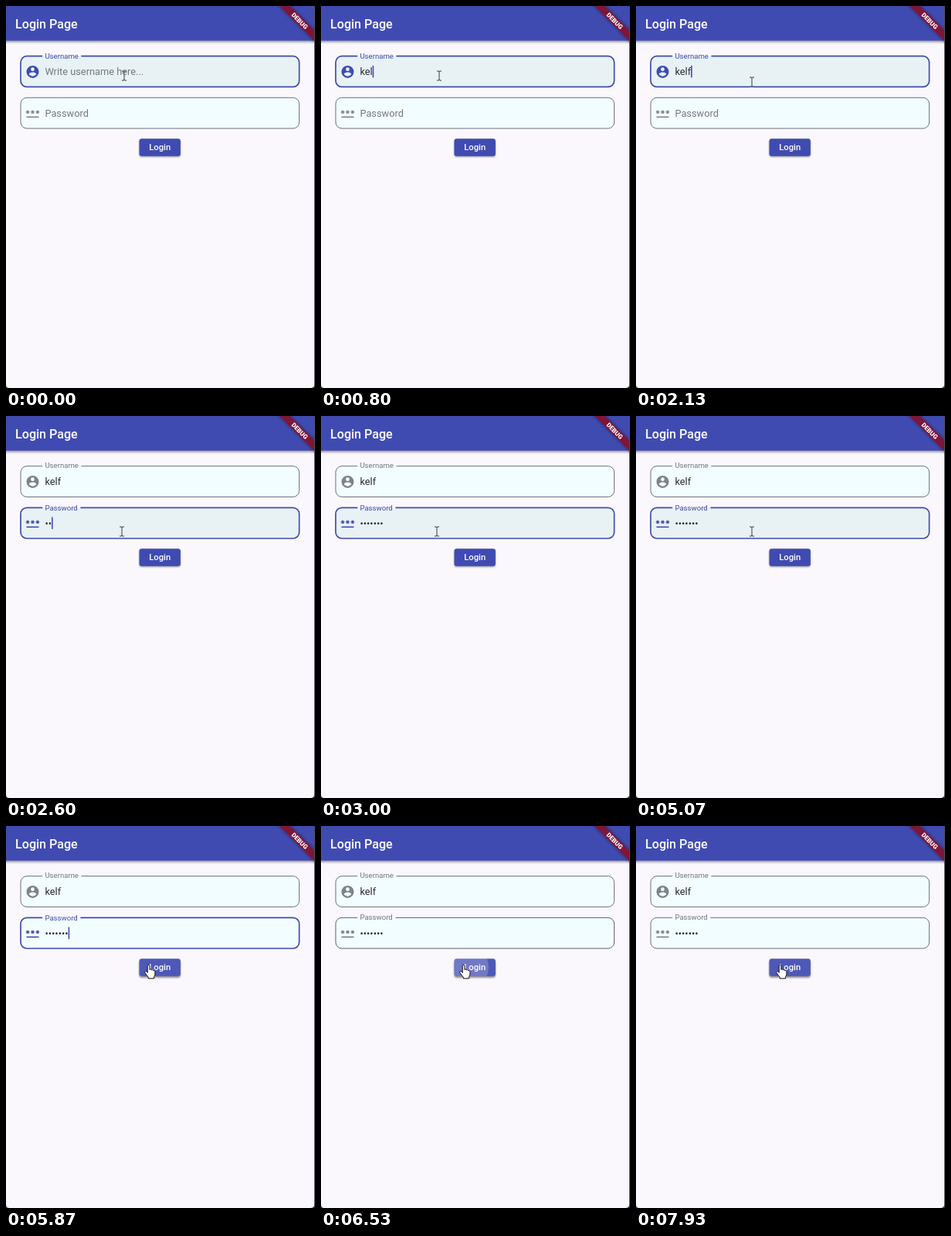
Recreate the animation shown at these times as an HTML page. Size 400 by 493 pixels, loop 8 s.

```html
<!DOCTYPE html>
<html lang="en">
<head>
<meta charset="utf-8">
<title>Login Page</title>
<style>
  html, body { margin: 0; width: 100%; height: 100%; overflow: hidden; background: #faf8fc; }
  svg { display: block; width: 100vw; height: 100vh; }
  text { font-family: Roboto, sans-serif; font-size: 12.8px; white-space: pre; }
</style>
</head>
<body>
<svg id="stage" viewBox="0 0 400 493">
  <defs>
    <filter id="barShadow" x="-5%" y="-20%" width="110%" height="160%">
      <feDropShadow dx="0" dy="1.8" stdDeviation="1.8" flood-opacity=".42"/>
    </filter>
    <filter id="ribbonShadow" x="-20%" y="-80%" width="140%" height="260%">
      <feDropShadow dx="0" dy="0" stdDeviation="2" flood-opacity=".5"/>
    </filter>
    <filter id="soft" x="-20%" y="-40%" width="140%" height="200%">
      <feGaussianBlur stdDeviation="1.2"/>
    </filter>
    <clipPath id="buttonClip"><rect x="172.5" y="171.2" width="53.4" height="22.6" rx="3.2"/></clipPath>
    <path id="star" d="M3.15 12.95 4 11.47l.85 1.48 1.3-.75-.85-1.48H7v-1.5H5.3l.85-1.47L4.85 7 4 8.47 3.15 7l-1.3.75.85 1.47H1v1.5h1.7l-.85 1.48z"/>
  </defs>

  <rect width="400" height="493" fill="#faf8fc"/>
  <rect x="-5" y="-10" width="410" height="54.7" fill="#404bb1" filter="url(#barShadow)"/>
  <text x="12" y="28.8" style="font-size:16.1px" fill="#fff" font-weight="500">Login Page</text>

  <g id="fields"></g>

  <rect id="buttonShadow" x="172.5" y="172.6" width="53.4" height="22.4" rx="3.2" filter="url(#soft)"/>
  <rect id="button" x="172.5" y="171.2" width="53.4" height="22.6" rx="3.2"/>
  <g clip-path="url(#buttonClip)"><circle id="ripple" cx="186" cy="182" fill="#fff"/></g>
  <text x="199.2" y="186.4" text-anchor="middle" style="font-size:11.2px" font-weight="500" fill="#fff">Login</text>

  <g transform="translate(399.4 0) rotate(45)">
    <rect x="-36" y="22.4" width="72" height="9.6" fill="#7d1638" filter="url(#ribbonShadow)"/>
    <text y="30.1" text-anchor="middle" style="font-size:8.16px" font-weight="900" fill="#fff">DEBUG</text>
  </g>

  <path d="M399.5 0V493" stroke="#4a4a52"/>
  <path d="M0 488.5Q0 493 4.5 493H0zM400 487V493H394Q399 493 400 487z" fill="#33333a"/>

  <g id="beam" fill="none">
    <path d="M-3-6H-1Q0-6 0-5Q0-6 1-6H3M0-5V5M-3 6H-1Q0 6 0 5Q0 6 1 6H3" stroke="#fff" stroke-width="2" opacity=".5"/>
    <path d="M-3-6H-1Q0-6 0-5Q0-6 1-6H3M0-5V5M-3 6H-1Q0 6 0 5Q0 6 1 6H3" stroke="#2e3236"/>
  </g>
  <path id="arrow" d="M0 0V13L3 10.3 5 15 7.2 14 5.2 9.5H9.2z" fill="#fff" stroke="#111" stroke-width=".9"/>
  <path id="hand" d="M-1.8-7.2Q-1.8-8.7-.5-8.7T.9-7.2V-2.6Q1.2-3.4 2.2-3.3T3.4-2Q3.8-2.7 4.7-2.5T5.8-1.2Q6.3-1.7 7.1-1.3T7.9.3V3.2Q7.9 5 6.6 6.5V8.8H-.8V7Q-3.2 4.6-4.9 1.5Q-5.7.2-4.7-.4T-2.8.1L-1.8 1.4Z" fill="#fff" stroke="#111" stroke-width="1" stroke-linejoin="round"/>
</svg>
<script>
const NS = 'http://www.w3.org/2000/svg';
const $ = id => document.getElementById(id);
const LOOP = 8000, NAME = 'kelf';
const PRIMARY = [64, 75, 177], GREY = [126, 131, 136], LINE = [92, 98, 102];
const FILL = [242, 253, 255], HOVER = [232, 242, 245];
const SWITCH = 2370, CLICK = 6400;
const nameKeys = [330, 500, 680, 930];
const dotKeys = Array.from({ length: 7 }, (_, i) => 2480 + i * 68);
const path = [[0, 153, 90], [2030, 153, 90], [2130, 150, 98], [2310, 150, 149],
  [5400, 150, 149], [5720, 185, 188], [6900, 185, 188], [7150, 187, 188], [LOOP, 187, 188]];

const clamp = v => Math.max(0, Math.min(1, v));
const lerp = (a, b, k) => a + (b - a) * k;
const ease = k => k * k * (3 - 2 * k);
const ramp = (t, start, length) => ease(clamp((t - start) / length));
const mix = (a, b, k) => `rgb(${a.map((v, i) => Math.round(lerp(v, b[i], k)))})`;
const typed = (keys, t) => keys.filter(k => t >= k).length;
const show = (el, on) => el.setAttribute('visibility', on ? 'visible' : 'hidden');

function set(el, attrs) {
  for (const k in attrs) el.setAttribute(k, attrs[k]);
  return el;
}
function add(parent, tag, attrs) {
  return parent.appendChild(set(document.createElementNS(NS, tag), attrs));
}

function makeField(y, title, hintText, drawIcon) {
  const g = add($('fields'), 'g', {});
  const fill = add(g, 'rect', { x: 19, y, width: 360.6, height: 39.7, rx: 8 });
  const border = add(g, 'path', { fill: 'none' });
  const icon = add(g, 'g', { transform: `translate(24.9 ${y + 10.6}) scale(.8)` });
  drawIcon(icon);
  const hint = add(g, 'text', { x: 50.4, y: y + 24.4, fill: '#73797d' });
  hint.textContent = hintText;
  const value = add(g, 'text', { x: 50.4, y: y + 24.4, fill: '#2a2c30' });
  const caret = add(g, 'rect', { y: y + 12.2, width: 1.6, height: 15.4, fill: '#404bb1' });
  const label = add(g, 'text', {});
  label.textContent = title;
  const labelWidth = title === 'Username' ? 43.6 : 42.6;

  return function draw({ focus, float, hover, text, blink }) {
    const gapL = lerp(68.8, 47.2, float), gapR = lerp(68.8, 50.4 + labelWidth + 3.4, float);
    const b = y + 39.7;
    set(fill, { fill: mix(FILL, HOVER, hover) });
    set(border, {
      d: `M${gapR} ${y}H371.6a8 8 0 0 1 8 8V${b - 8}a8 8 0 0 1-8 8H27a8 8 0 0 1-8-8V${y + 8}a8 8 0 0 1 8-8H${gapL}`,
      stroke: mix(LINE, PRIMARY, focus), 'stroke-width': lerp(.9, 1.7, focus)
    });
    set(icon, { fill: mix(GREY, PRIMARY, focus) });
    set(label, {
      transform: `translate(50.4 ${lerp(y + 24.4, y + lerp(2.7, 3.4, focus), float)}) scale(${lerp(1, .75, float)})`,
      fill: mix([115, 121, 125], PRIMARY, focus)
    });
    if (value.textContent !== text) value.textContent = text;
    show(hint, !text && float === 1);
    show(caret, blink);
    if (blink) set(caret, { x: 50.4 + (text ? value.getComputedTextLength() : 0) });
  };
}

const drawUser = makeField(64.7, 'Username', 'Write username here...', icon =>
  add(icon, 'path', { d: 'M12 2a10 10 0 1 0 0 20 10 10 0 0 0 0-20zm0 3a3 3 0 0 1 0 6 3 3 0 0 1 0-6zm0 14.2c-2.5 0-4.7-1.3-6-3.2 0-2 4-3.1 6-3.1s6 1.1 6 3.1c-1.3 1.9-3.5 3.2-6 3.2z', 'fill-rule': 'evenodd' }));
const drawPass = makeField(118.3, 'Password', '', icon => {
  for (const x of [0, 8, 16]) add(icon, 'use', { href: '#star', x });
  add(icon, 'rect', { x: 2, y: 17, width: 20, height: 2 });
});

function pointer(t) {
  const i = Math.max(1, path.findIndex(p => p[0] > t));
  const [t0, x0, y0] = path[i - 1], [t1, x1, y1] = path[i];
  const k = ease(clamp((t - t0) / (t1 - t0)));
  return [lerp(x0, x1, k), lerp(y0, y1, k)];
}

function render(t) {
  const [x, y] = pointer(t);
  const overUser = y > 64 && y < 105, overPass = y > 118 && y < 158;
  const overButton = x > 172 && y > 171;
  const passFocus = ramp(t, SWITCH, 167) * (1 - ramp(t, CLICK, 167));
  const nameCount = typed(nameKeys, t);
  const lastKey = nameCount ? nameKeys[nameCount - 1] : -500;

  drawUser({
    focus: 1 - ramp(t, SWITCH, 167), float: 1, hover: +overUser,
    text: NAME.slice(0, nameCount),
    blink: t < SWITCH && (t - lastKey) % 1000 < 500
  });
  drawPass({
    focus: passFocus, float: ramp(t, SWITCH, 167), hover: +overPass,
    text: '•'.repeat(typed(dotKeys, t)),
    blink: t >= SWITCH && t < CLICK && (t - 2450 + 1000) % 1000 < 500
  });

  const lift = overButton ? ramp(t, 5650, 150) : 0;
  set($('button'), { fill: mix(PRIMARY, [78, 88, 183], lift) });
  set($('buttonShadow'), { transform: `translate(0 ${lift * .8})`, opacity: lerp(.36, .45, lift) });
  const wave = clamp((t - CLICK + 80) / 300);
  set($('ripple'), { r: 44 * wave, opacity: wave ? .2 * (1 - ramp(t, CLICK + 120, 320)) : 0 });

  const beam = overUser || overPass;
  show($('beam'), beam);
  show($('hand'), overButton);
  show($('arrow'), !beam && !overButton);
  for (const id of ['beam', 'hand', 'arrow']) set($(id), { transform: `translate(${x} ${y})` });
}

const start = performance.now();
function tick() {
  render((performance.now() - start) % LOOP);
  requestAnimationFrame(tick);
}
tick();
</script>
</body>
</html>
```
